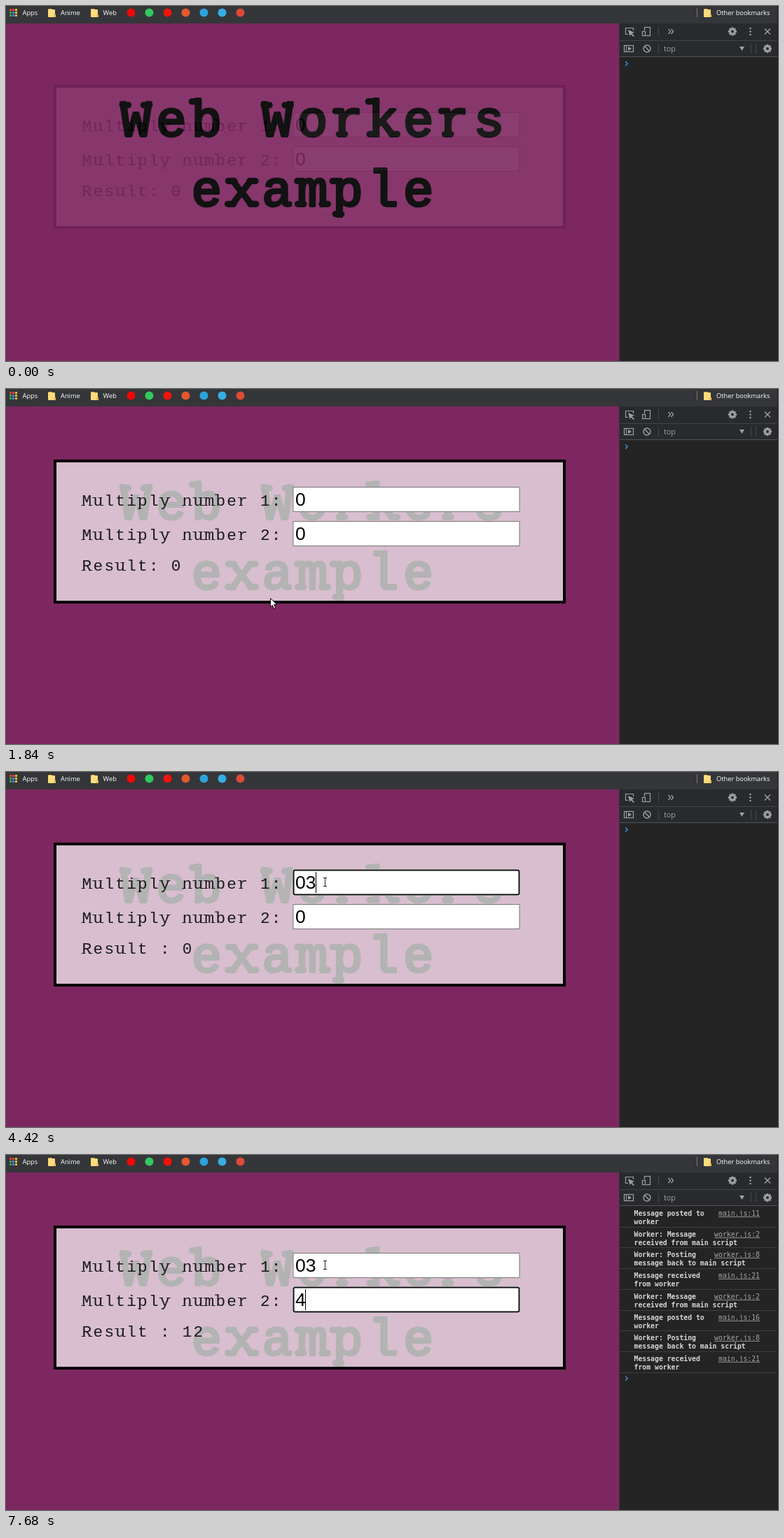
These frames come from a looping animation (1102 by 508 pixels, 8000 ms). An HTML page with a canvas:

```html
<!DOCTYPE html>
<html lang="en">
<head>
<meta charset="utf-8">
<title>Web Workers example</title>
<style>
html, body { margin: 0; width: 100%; height: 100%; overflow: hidden; background: #7d2760; }
canvas { display: block; }
</style>
</head>
<body>
<canvas id="stage" width="1102" height="508"></canvas>
<script>
const LOOP = 8000;
const HOVER = 1840;
const MONO = '"Liberation Mono", "Courier New", monospace';
const SANS = '"Liberation Sans", Arial, sans-serif';
const UI = '"Open Sans", "Noto Sans", sans-serif';
const LOG = '"DejaVu Sans Mono", monospace';

const stage = document.getElementById('stage').getContext('2d');
const layer = document.createElement('canvas');
layer.width = 1102;
layer.height = 508;
const card = layer.getContext('2d');

function rect(c, x, y, w, h, color) {
  c.fillStyle = color;
  c.fillRect(x, y, w, h);
}

function round(c, x, y, w, h, r, color) {
  c.fillStyle = color;
  c.beginPath();
  c.roundRect(x, y, w, h, r);
  c.fill();
}

function dot(c, x, y, r, color) {
  c.fillStyle = color;
  c.beginPath();
  c.arc(x, y, r, 0, 7);
  c.fill();
}

function text(c, str, x, y, font, color, align = 'left') {
  c.font = font;
  c.fillStyle = color;
  c.textAlign = align;
  c.fillText(str, x, y);
}

function line(c, color, width, ...pts) {
  c.strokeStyle = color;
  c.lineWidth = width;
  c.beginPath();
  for (let i = 0; i < pts.length; i += 2) c.lineTo(pts[i], pts[i + 1]);
  c.stroke();
}

// Slab serifs per letter: pairs of centre x and edge y, in em
const SLABS = {
  W: [.12, .65, .48, .65], M: [.1, 0, .5, 0], R: [.11, 0, .5, 0],
  b: [.1, .72], k: [.1, .72, .12, 0, .49, 0], r: [.14, .53, .2, 0],
  x: [.12, .53, .48, .53, .11, 0, .49, 0], m: [.09, .53, .1, 0, .51, 0],
  p: [.09, .53, .14, -.2], n: [.13, 0, .47, 0],
  u: [.1, .53, .42, .53, .5, 0], y: [.1, .53, .5, .53]
};

// Typewriter face: small letters in wide cells, with slabs and a round pen when heavy
function slabText(c, str, x, y, size, heavy, color) {
  const em = size * .86, gap = (size - em) * .6;
  const pen = heavy ? size * .045 : 0;
  const thick = size * (heavy ? .11 : .04), half = size * .105;
  c.save();
  c.letterSpacing = gap + 'px';
  text(c, str, x + gap / 2, y, `${em}px ${MONO}`, color);
  if (heavy) {
    c.strokeStyle = color;
    c.lineWidth = pen;
    c.lineJoin = 'round';
    c.strokeText(str, x + gap / 2, y);
  }
  c.restore();
  [...str].forEach((ch, i) => {
    const s = SLABS[ch] || [];
    for (let k = 0; k < s.length; k += 2) {
      const top = y - s[k + 1] * em + (s[k + 1] > .1 ? -pen / 2 : pen / 2 - thick);
      round(c, x + (i * .6 + s[k]) * size - half, top, half * 2, thick, thick / 2, color);
    }
  });
}

function folder(x) {
  round(stage, x, 4, 6, 6, 1, '#e3b64f');
  round(stage, x, 5, 10, 11, 1, '#ffdc7c');
  rect(stage, x + 8, 12, 3, 4, '#e9bf5a');
}

function drawBookmarks() {
  rect(stage, 0, 0, 1102, 25, '#35363a');
  const dots = ['#e8453c', '#e8453c', '#f9bb2d', '#3aa757', '#4688f1', '#f9bb2d', '#3aa757', '#4688f1', '#f9bb2d'];
  dots.forEach((color, i) => rect(stage, 5 + i % 3 * 4, 4 + (i / 3 | 0) * 4, 3, 3, color));
  const label = (s, x) => text(stage, s, x, 13, `500 9.3px ${UI}`, '#fff');
  label('Apps', 23.5);
  folder(60);
  label('Anime', 78);
  folder(121);
  label('Web', 138.5);
  ['#f00808', '#31c95c', '#f0140c', '#e4572e', '#2ba3dc', '#35aee2', '#dd4a38']
    .forEach((color, i) => dot(stage, 178.5 + 26 * i, 9.5, 6, color));
  rect(stage, 986, 3, 1, 13, '#77787b');
  folder(996);
  label('Other bookmarks', 1014);
}

function gear(x, y) {
  stage.save();
  stage.translate(x, y);
  for (let i = 0; i < 4; i++) {
    rect(stage, -1.5, -6, 3, 12, '#9da1a5');
    stage.rotate(Math.PI / 4);
  }
  stage.restore();
  dot(stage, x, y, 4.6, '#9da1a5');
  dot(stage, x, y, 2, '#292a2d');
}

function drawToolbars() {
  const c = stage, grey = '#9da1a5';
  rect(c, 875, 25, 227, 483, '#242424');
  rect(c, 876, 25, 226, 48, '#292a2d');
  rect(c, 875, 25, 1, 483, '#3a3338');
  rect(c, 876, 49, 226, 1, '#424448');
  rect(c, 876, 72, 226, 1, '#505256');

  // inspect and device icons
  line(c, grey, 1.2, 888, 40.5, 884.5, 40.5, 884.5, 31.5, 895.5, 31.5, 895.5, 35);
  c.fillStyle = grey;
  c.beginPath();
  [[888, 34], [897, 38], [893.5, 39.2], [897, 43], [895.6, 44], [892.2, 40.4], [890.6, 43]]
    .forEach(p => c.lineTo(...p));
  c.fill();
  c.strokeStyle = grey;
  c.lineWidth = 1.2;
  c.strokeRect(911.5, 30.5, 8, 12);
  rect(c, 907.5, 35, 6, 9, '#292a2d');
  c.strokeRect(908.5, 36.5, 4, 6);

  line(c, grey, 1.3, 945.5, 33, 948.5, 36.5, 945.5, 40);
  line(c, grey, 1.3, 949.5, 33, 952.5, 36.5, 949.5, 40);
  gear(1037, 36.5);
  for (const y of [32, 36.5, 41]) dot(c, 1062.5, y, 1.3, grey);
  line(c, grey, 1.5, 1083, 32.5, 1091, 40.5);
  line(c, grey, 1.5, 1091, 32.5, 1083, 40.5);

  // console row
  c.strokeStyle = grey;
  c.lineWidth = 1.2;
  c.strokeRect(882.5, 56.5, 13, 9);
  rect(c, 885, 56, 1, 10, grey);
  c.fillStyle = grey;
  c.beginPath();
  c.moveTo(888, 58);
  c.lineTo(893, 61);
  c.lineTo(888, 64);
  c.fill();
  c.lineWidth = 1.4;
  c.beginPath();
  c.arc(915, 61, 5, 0, 7);
  c.stroke();
  line(c, grey, 1.4, 911.5, 57.5, 918.5, 64.5);
  for (const [x, y] of [[931, 29], [931, 54], [1063, 54], [1070, 54]]) rect(c, x, y, 1, 14, '#45474b');
  text(c, 'top', 939, 64.5, `10.8px ${UI}`, '#9da1a5');
  c.fillStyle = grey;
  c.beginPath();
  c.moveTo(1047, 58);
  c.lineTo(1054, 58);
  c.lineTo(1050.5, 64);
  c.fill();
  gear(1087, 61);
}

const POSTED = ['Message posted to', 'worker'];
const GOT = ['Worker: Message', 'received from main script', 'worker.js:2'];
const REPLY = ['Worker: Posting', 'message back to main script', 'worker.js:8'];
const DONE = ['Message received', 'from worker', 'main.js:21'];
const MESSAGES = [
  [...POSTED, 'main.js:11'], GOT, REPLY, DONE,
  GOT, [...POSTED, 'main.js:16'], REPLY, DONE
];

function drawLog(t) {
  const count = t < 4490 ? 0 : t < 6670 ? 4 : 8;
  MESSAGES.slice(0, count).forEach(([first, second, link], i) => {
    const y = 73 + 29.7 * i;
    text(stage, first, 896.5, y + 14, `bold 9.8px ${LOG}`, '#d6d6d6');
    text(stage, second, 896.5, y + 26, `bold 9.8px ${LOG}`, '#d6d6d6');
    text(stage, link, 1076, y + 14, `9.8px ${LOG}`, '#a5a5a5', 'right');
    const w = link.length * 5.9;
    rect(stage, 1076 - w, Math.round(y + 15), w, 1, '#8d8d8d');
    rect(stage, 876, Math.round(y + 29.7), 226, 1, '#3d3d3d');
  });
  const y = 82.5 + 29.65 * count;
  line(stage, count === 8 ? '#5c7fa8' : '#3b8fd8', 1.5, 884, y - 3, 887.3, y, 884, y + 3);
}

function drawInput(y, value, focus, caret, selected) {
  const c = card;
  if (focus) {
    round(c, 409, y - 1, 325, 38, 3, '#fff');
    round(c, 409.5, y - .5, 324, 37, 3, '#0c0c0c');
    round(c, 411.5, y + 1.5, 320, 33, 1, '#fff');
  } else {
    round(c, 409.5, y, 324, 36, 1, '#767676');
    rect(c, 410.5, y + 1, 322, 34, '#fff');
  }
  if (selected) rect(c, 413, y + 3, 15, 29, '#3390ff');
  text(c, value, 413, y + 27, `26.5px ${SANS}`, selected ? '#fff' : '#000');
  if (caret) rect(c, 413 + 14.75 * value.length | 0, y + 3, 1, 30, '#000');
}

const between = (t, a, b) => t >= a && t < b;

function drawCard(t) {
  card.clearRect(0, 0, 1102, 508);
  rect(card, 72, 105, 723, 198, 'rgba(255,255,255,.7)');
  card.strokeStyle = '#000';
  card.lineWidth = 4;
  card.strokeRect(70, 103, 727, 202);

  const ink = '#1a1a1a';
  slabText(card, 'Multiply number 1:', 107.5, 167, 26.5, false, ink);
  slabText(card, 'Multiply number 2:', 107.5, 216, 26.5, false, ink);
  const result = t < 4420 ? 'Result: 0' : t < 6600 ? 'Result : 0' : 'Result : 12';
  slabText(card, result, 107.5, 260, 26.5, false, ink);

  const caret1 = between(t, 3020, 3550) || between(t, 4110, 4960);
  const caret2 = between(t, 6600, 7140) || t >= 7680;
  drawInput(140, t < 4420 ? '0' : '03', between(t, 3020, 5440), caret1, false);
  drawInput(189, t < 6600 ? '0' : '4', t >= 5440, caret2, between(t, 5440, 6600));

  if (between(t, 3090, 4420)) {
    round(card, 408.5, 177.5, 325.5, 43.5, 3, '#55565a');
    round(card, 409, 178, 324.5, 42, 3, '#292a2d');
    text(card, '02', 418.5, 203, `bold 10px ${UI}`, '#e8eaed');
  }

  const raised = t >= HOVER;
  stage.globalAlpha = raised ? 1 : .1;
  stage.drawImage(layer, 0, raised ? 0 : 12);
  stage.globalAlpha = 1;
}

const PATH = [
  [1230, 966, 494], [1770, 429, 315], [1840, 377, 299], [1930, 338, 268],
  [2000, 321, 245], [2200, 340, 225], [2450, 420, 175], [2680, 455, 157]
];

function pointerAt(t) {
  const now = Math.max(1230, 1770 + 70 * Math.floor((t - 1770) / 70));
  const i = PATH.findIndex(p => p[0] > now);
  if (i < 0) return PATH[PATH.length - 1].slice(1);
  const [t0, x0, y0] = PATH[i - 1], [t1, x1, y1] = PATH[i];
  const k = (now - t0) / (t1 - t0);
  return [Math.round(x0 + (x1 - x0) * k), Math.round(y0 + (y1 - y0) * k)];
}

function drawPointer(t) {
  if (t < 1230) return;
  const [x, y] = pointerAt(t);
  const c = stage;
  c.save();
  c.translate(x, y);
  if (x > 409 && y < 177) {
    rect(c, 0, -6, 1, 13, '#222');
    for (const dy of [-6, 6]) {
      rect(c, -2, dy, 2, 1, '#222');
      rect(c, 1, dy, 2, 1, '#222');
    }
  } else {
    c.beginPath();
    [[.5, .5], [.5, 13], [3.4, 10.3], [5.4, 15], [7.6, 14], [5.6, 9.5], [9.5, 9.5]]
      .forEach(p => c.lineTo(...p));
    c.closePath();
    c.fillStyle = '#fff';
    c.fill();
    c.strokeStyle = '#111';
    c.lineWidth = 1;
    c.stroke();
  }
  c.restore();
}

function draw(t) {
  rect(stage, 0, 0, 1102, 508, '#7d2760');
  slabText(stage, 'Web Workers', 160.3, 186, 84, true, '#000');
  slabText(stage, 'example', 261.1, 286, 84, true, '#000');
  drawCard(t);
  drawBookmarks();
  drawToolbars();
  drawLog(t);
  rect(stage, 1101, 0, 1, 508, '#17181a');
  drawPointer(t);
}

const start = performance.now();
function frame() {
  draw((performance.now() - start) % LOOP);
  requestAnimationFrame(frame);
}
frame();
</script>
</body>
</html>
```
